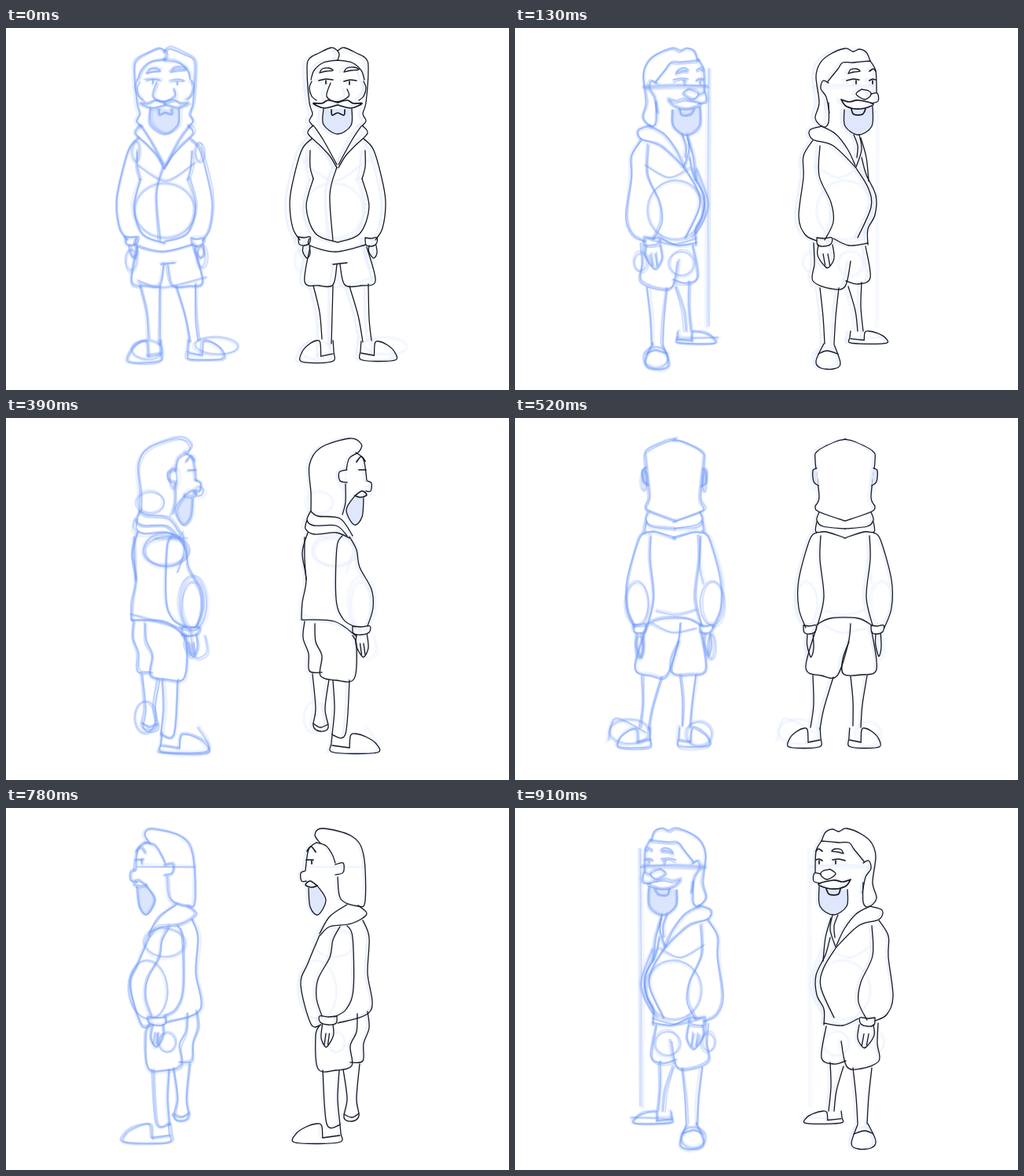
Animation, 640 px wide and 461 px high, one loop 1040 ms. Source, as an HTML page with a canvas:

```html
<!DOCTYPE html>
<html lang="en">
<head>
<meta charset="utf-8">
<title>Character turnaround</title>
<style>
html, body { margin: 0; width: 100%; height: 100%; overflow: hidden; background: #fff }
canvas { display: block }
</style>
</head>
<body>
<canvas id="stage" width="640" height="461"></canvas>
<script>
let strokes, axis, offset = 0;

// Each call records one smooth curve through x, y pairs.
const add = (kind, n) => {
  const points = [];
  for (let i = 0; i < n.length; i += 2) points.push([n[i] + offset, n[i + 1]]);
  strokes.push({ kind, points });
};
const line = (...n) => add('line', n);
const bold = (...n) => add('bold', n);
const tint = (...n) => add('tint', n);
const rough = (...n) => add('rough', n);
const oval = (...n) => add('oval', n);
const both = (draw, ...n) => {
  draw(...n);
  draw(...n.map((v, i) => i % 2 ? v : 2 * axis - v));
};

// Repeated body parts.
const eye = (x, y, w, pupil = x) => {
  bold(x - w, y, x, y - 2, x + w, y - 1);
  bold(pupil, y, pupil, y + 4);
};
const brow = (x, y, w) => line(x, y, x + w * .2, y - 5, x + w * .7, y - 6, x + w, y - 3, x + w * .5, y - 2, x, y);
const cuff = (x, y, w) => line(x, y, x + 1, y + 9, x + w / 2, y + 11, x + w, y + 8, x + w + 1, y, x + w / 2, y + 1, x, y);
const hand = (x, y, w, h) => {
  line(x, y, x - w * .05, y + h * .45, x + w * .35, y + h * .9, x + w * .65, y + h, x + w, y + h * .6, x + w * .9, y);
  if (w > 12) for (const f of [.3, .6]) line(x + w * f, y + h * .4, x + w * (f + .13), y + h * .9);
};
const slipper = (x, y, w, h) => {
  const at = (u, v) => [x + u * w, y - v * h];
  line(...at(.02, 1), ...at(0, .5), ...at(0, .08), ...at(.45, -.02), ...at(.98, .06),
    ...at(.93, .5), ...at(.73, .83), ...at(.5, 1), ...at(.4, .9), ...at(.38, .3));
  line(...at(.02, .4), ...at(.38, .28));
};

function front() {
  both(line, 422, 29, 414, 25, 398, 32, 386, 39, 383, 52, 386, 95, 390, 109, 386, 118, 391, 125);
  both(line, 422, 41, 404, 44, 392, 54, 388, 66);
  both(line, 389, 68, 386, 76, 389, 87, 395, 92);
  line(422, 29, 424, 34, 422, 41);
  brow(399, 57, 17);
  brow(430, 56, 19);
  eye(407, 67, 9);
  eye(438, 68, 8, 437);
  line(413, 70, 408, 87, 421, 94, 436, 87, 434, 78);
  tint(404, 103, 404, 123, 422, 135, 439, 124, 440, 103);
  both(bold, 422, 95, 410, 92, 402, 96, 391, 96, 405, 102, 422, 98);
  bold(414, 104, 415, 111, 422, 108, 430, 111, 431, 104);

  both(line, 391, 124, 384, 134, 399, 149, 412, 163, 421, 178);
  both(line, 392, 125, 404, 143, 421, 174);
  line(421, 177, 412, 212, 416, 271);
  both(line, 391, 192, 382, 228, 394, 262, 422, 273);
  line(386, 268, 387, 277, 420, 285, 458, 276);
  both(line, 389, 141, 376, 156, 364, 200, 361, 225, 365, 255, 374, 270);
  both(line, 387, 156, 387, 177, 391, 192);
  cuff(372, 266, 14);
  cuff(457, 267, 14);
  hand(378, 278, 9, 15);
  hand(462, 277, 10, 16);

  line(387, 278, 380, 323, 398, 328, 416, 327, 421, 301);
  line(425, 301, 431, 327, 452, 328, 470, 322, 459, 279);
  line(416, 301, 434, 299);
  line(391, 328, 399, 362, 402, 396);
  line(416, 328, 414, 402);
  line(437, 329, 448, 366, 454, 400);
  line(461, 326, 462, 370, 465, 398);
  slipper(417, 426, -43, 28);
  slipper(451, 424, 46, 25);

  oval(203, 233, 38, 35);
  oval(166, 158, 5, 12);
  oval(246, 158, 5, 12);
  oval(159, 296, 7, 14);
  oval(249, 292, 6, 14);
  oval(267, 405, 28, 12);
  oval(180, 410, 20, 13);
  rough(168, 175, 203, 195, 240, 172);
  rough(168, 322, 200, 331, 255, 318);
}

function quarter() {
  line(399, 95, 399, 120, 392, 126, 382, 115, 387, 95, 383, 62, 388, 45, 400, 34, 420, 26, 430, 30, 438, 27, 447, 31, 452, 42);
  line(398, 68, 411, 52, 417, 44, 430, 44, 452, 42);
  line(399, 70, 392, 67, 389, 77, 396, 88, 400, 108);
  line(452, 42, 459, 55, 460, 82);
  brow(424, 58, 15);
  bold(451, 55, 456, 52, 459, 55);
  eye(430, 67, 8, 434);
  eye(455, 67, 4);
  line(441, 78, 434, 84, 445, 91, 453, 85, 450, 80, 441, 78);
  line(453, 84, 461, 83, 462, 93, 453, 96);
  tint(419, 104, 420, 125, 437, 136, 454, 125, 455, 100);
  bold(415, 91, 425, 94, 437, 92, 456, 97, 440, 103, 422, 100, 415, 91);
  bold(428, 103, 431, 110, 442, 110, 446, 103);

  line(391, 125, 375, 130, 379, 142, 405, 150, 433, 177);
  line(390, 125, 408, 135, 423, 154, 433, 175);
  line(431, 136, 436, 150, 435, 165);
  line(438, 136, 441, 155, 434, 177);
  line(440, 140, 447, 165, 450, 195);
  line(441, 165, 447, 187, 459, 213, 458, 238, 449, 256, 449, 276);
  line(433, 177, 449, 203, 453, 228, 436, 267);
  line(405, 268, 425, 277, 449, 274);
  line(379, 143, 367, 163, 367, 190, 361, 240, 369, 263, 384, 271);
  line(388, 150, 387, 188, 402, 222, 405, 247, 394, 270);
  cuff(384, 267, 18);
  hand(386, 276, 20, 29);

  line(380, 274, 381, 300, 379, 322, 402, 332, 420, 329, 427, 297);
  line(421, 322, 436, 326, 452, 318, 446, 278);
  line(388, 331, 392, 368, 394, 402);
  line(412, 331, 408, 368, 406, 402);
  line(393, 402, 383, 424, 389, 433, 406, 434, 414, 427, 406, 403);
  line(386, 415, 397, 411, 411, 415);
  line(424, 329, 433, 360, 436, 386);
  line(441, 324, 440, 355, 443, 386);
  slipper(426, 402, 48, 16);

  rough(163, 75, 203, 73, 245, 75);
  rough(164, 77, 244, 74);
  rough(247, 52, 246, 200, 246, 380);
  rough(165, 174, 195, 190, 222, 178);
  rough(232, 180, 246, 225, 231, 262);
  rough(228, 180, 241, 225, 225, 266);
  rough(205, 396, 258, 395);
  rough(170, 268, 200, 275, 230, 268);
  oval(205, 232, 36, 38);
  oval(160, 298, 8, 12);
  oval(180, 420, 15, 13);
  oval(212, 300, 16, 16);
}

function sideFace() {
  line(445, 44, 455, 53, 459, 79);
  bold(446, 56, 452, 49, 457, 55);
  bold(449, 66, 458, 66);
  line(459, 80, 465, 83, 464, 93, 458, 93);
  tint(444, 99, 433, 117, 443, 136, 453, 126, 455, 102);
  bold(444, 99, 453, 93, 459, 98, 451, 101, 444, 99);
}

function sideSleeve() {
  line(428, 150, 421, 165, 420, 230, 429, 256, 444, 266);
  line(437, 151, 446, 168, 450, 190, 465, 218, 467, 242, 460, 265);
  cuff(441, 265, 21);
  hand(446, 276, 15, 28);
}

function sideLegs() {
  line(380, 259, 378, 280, 385, 300, 386, 322, 402, 324);
  line(393, 262, 394, 285, 402, 303, 400, 328, 420, 334, 443, 332, 446, 290, 441, 277);
  line(390, 326, 394, 370, 391, 392, 400, 399, 410, 394, 406, 370, 411, 333);
  line(391, 389, 400, 394, 410, 390);
  line(416, 334, 418, 370, 415, 403);
  line(437, 334, 432, 402, 416, 404);
  slipper(414, 427, 61, 25);
}

function profile() {
  line(418, 88, 414, 116, 392, 125, 383, 118, 385, 60, 400, 36, 437, 26, 447, 34, 440, 45);
  line(421, 70, 425, 59, 433, 48, 445, 44);
  line(421, 72, 411, 70, 411, 82, 421, 85);
  sideFace();
  bold(451, 67, 451, 71);
  line(392, 124, 381, 135, 400, 147, 428, 151, 440, 162);
  line(406, 123, 428, 138, 441, 160);
  line(386, 143, 378, 165, 380, 210, 376, 258, 418, 274);
  line(441, 162, 456, 198, 465, 225, 452, 275, 439, 276);
  offset = -22;
  sideSleeve();
  offset = 0;
  sideLegs();
  oval(203, 172, 26, 18);
  oval(224, 232, 24, 38);
  oval(200, 298, 10, 12);
  rough(165, 75, 238, 74);
}

function backQuarter() {
  line(388, 118, 388, 95, 386, 60, 400, 38, 437, 26, 452, 33, 449, 43, 437, 51, 433, 66);
  line(434, 66, 424, 69, 425, 80, 434, 82);
  line(432, 84, 432, 107, 428, 123);
  sideFace();
  line(388, 118, 383, 130, 392, 137, 420, 137, 434, 150);
  line(383, 130, 381, 141, 392, 148, 420, 146, 437, 153);
  line(388, 119, 397, 125, 425, 128, 441, 150);
  line(384, 146, 377, 172, 382, 206, 377, 235, 376, 257);
  line(380, 152, 380, 180, 382, 206);
  line(377, 257, 418, 259, 446, 278);
  sideSleeve();
  sideLegs();

  oval(205, 170, 29, 18);
  oval(203, 168, 27, 22);
  oval(238, 236, 18, 34);
  oval(237, 238, 13, 30);
  oval(184, 108, 18, 14);
  oval(214, 76, 5, 14);
  oval(246, 94, 6, 6);
  oval(178, 382, 14, 20);
  rough(190, 154, 230, 154);
  rough(159, 250, 195, 260, 235, 272);
  rough(224, 145, 226, 170, 218, 196);
  rough(235, 270, 240, 305, 256, 300, 254, 278);
  rough(193, 426, 256, 424, 244, 394);
}

function back() {
  both(line, 421, 27, 408, 30, 385, 42, 382, 55, 387, 100, 382, 113, 388, 120, 420, 131);
  both(tint, 384, 64, 379, 67, 380, 81, 386, 86);
  both(line, 387, 120, 384, 130, 392, 138, 420, 141);
  both(line, 384, 132, 383, 145, 396, 145, 421, 153);
  both(line, 384, 146, 375, 155, 361, 206, 361, 242, 370, 267);
  both(line, 389, 150, 388, 180, 393, 228, 385, 264);
  cuff(367, 264, 15);
  cuff(453, 264, 15);
  hand(372, 276, 8, 28);
  hand(459, 275, 7, 28);
  line(384, 263, 402, 255, 436, 255, 454, 264);

  line(384, 266, 370, 318, 390, 328, 410, 328, 424, 287, 427, 262);
  line(425, 285, 417, 307, 418, 326, 440, 327, 460, 320, 454, 272);
  line(379, 328, 380, 365, 376, 394);
  line(405, 330, 393, 370, 388, 396);
  line(427, 329, 430, 360, 430, 392);
  line(448, 328, 442, 365, 440, 394);
  slipper(389, 420, -42, 25);
  slipper(425, 420, 40, 25);

  oval(165, 80, 3, 13);
  oval(240, 82, 2, 13);
  oval(155, 236, 15, 28);
  oval(252, 236, 14, 28);
  oval(146, 399, 25, 15);
  oval(234, 402, 16, 15);
  oval(159, 292, 5, 14);
  oval(250, 292, 5, 16);
  rough(236, 150, 235, 185, 239, 210);
  rough(118, 412, 128, 384, 166, 402);
  rough(180, 245, 205, 250, 230, 244);
  rough(175, 262, 200, 274, 230, 268);
}

let seed = 7;
const jitter = size => {
  seed = (seed * 16807) % 2147483647;
  return (seed / 2147483647 - .5) * 2 * size;
};

// Traces a Catmull-Rom curve, moved by dx and roughened by wobble.
function trace(g, { kind, points }, dx = 0, wobble = 0) {
  g.beginPath();
  const ox = dx + jitter(wobble), oy = jitter(wobble);
  if (kind === 'oval') {
    const [[x, y], [rx, ry]] = points;
    g.ellipse(x + ox, y + oy, rx + jitter(wobble), ry + jitter(wobble), jitter(.1), 0, 7);
    return;
  }
  const pts = points.map(([x, y]) => [x + ox + jitter(wobble * .7), y + oy + jitter(wobble * .7)]);
  const at = i => pts[Math.max(0, Math.min(pts.length - 1, i))];
  g.moveTo(...pts[0]);
  for (let i = 0; i < pts.length - 1; i++) {
    const [a, b, c, d] = [at(i - 1), at(i), at(i + 1), at(i + 2)];
    g.bezierCurveTo(b[0] + (c[0] - a[0]) / 6, b[1] + (c[1] - a[1]) / 6,
      c[0] - (d[0] - b[0]) / 6, c[1] - (d[1] - b[1]) / 6, ...c);
  }
}

const isRough = ({ kind }) => kind === 'oval' || kind === 'rough';

function drawSketch(g, shift) {
  g.strokeStyle = g.fillStyle = '#6f97f7';
  for (const stroke of strokes) {
    const loose = isRough(stroke), dx = loose ? 0 : shift;
    if (stroke.kind === 'tint') {
      trace(g, stroke, dx);
      g.globalAlpha = .25;
      g.fill();
    }
    for (const [width, alpha] of [[5, .13], [2.6, .3], [1.8, .32], [1.3, .32]]) {
      g.lineWidth = width;
      g.globalAlpha = loose ? alpha * .65 : alpha;
      trace(g, stroke, dx, 1.5);
      g.stroke();
    }
  }
}

function drawInk(g) {
  g.strokeStyle = '#17181f';
  g.fillStyle = '#dfe7fc';
  for (const stroke of strokes) {
    if (isRough(stroke)) continue;
    trace(g, stroke);
    if (stroke.kind === 'tint') g.fill();
    g.lineWidth = stroke.kind === 'bold' ? 1.7 : 1.3;
    g.stroke();
  }
}

function layer(draw, ...args) {
  const canvas = document.createElement('canvas');
  canvas.width = 640;
  canvas.height = 461;
  const g = canvas.getContext('2d');
  g.lineCap = g.lineJoin = 'round';
  draw(g, ...args);
  return canvas;
}

function render(pose, shift, middle) {
  strokes = [];
  axis = middle;
  pose();
  return { sketch: layer(drawSketch, shift), ink: layer(drawInk) };
}

const f = render(front, -220, 422), q = render(quarter, -219), p = render(profile, -218);
const bq = render(backQuarter, -217), b = render(back, -217, 420);
// Each view: layers, then the mirror sums for the sketch and the ink.
const views = [[f], [q], [p], [bq], [b], [bq, 405, 837], [p, 405, 840], [q, 406, 842]];
const ctx = document.getElementById('stage').getContext('2d');

function place(image, x, alpha, mirror) {
  if (mirror) ctx.setTransform(-1, 0, 0, 1, mirror + x, 0);
  else ctx.setTransform(1, 0, 0, 1, x, 0);
  ctx.globalAlpha = alpha;
  ctx.drawImage(image, 0, 0);
}

function draw() {
  const [{ sketch, ink }, sketchMirror, inkMirror] = views[Math.floor(performance.now() % 1040 / 130)];
  ctx.setTransform(1, 0, 0, 1, 0, 0);
  ctx.globalAlpha = 1;
  ctx.fillStyle = '#fff';
  ctx.fillRect(0, 0, 640, 461);
  place(sketch, 0, 1, sketchMirror);
  place(sketch, 215, .2, sketchMirror);
  place(ink, 0, 1, inkMirror);
  requestAnimationFrame(draw);
}
draw();
</script>
</body>
</html>
```
